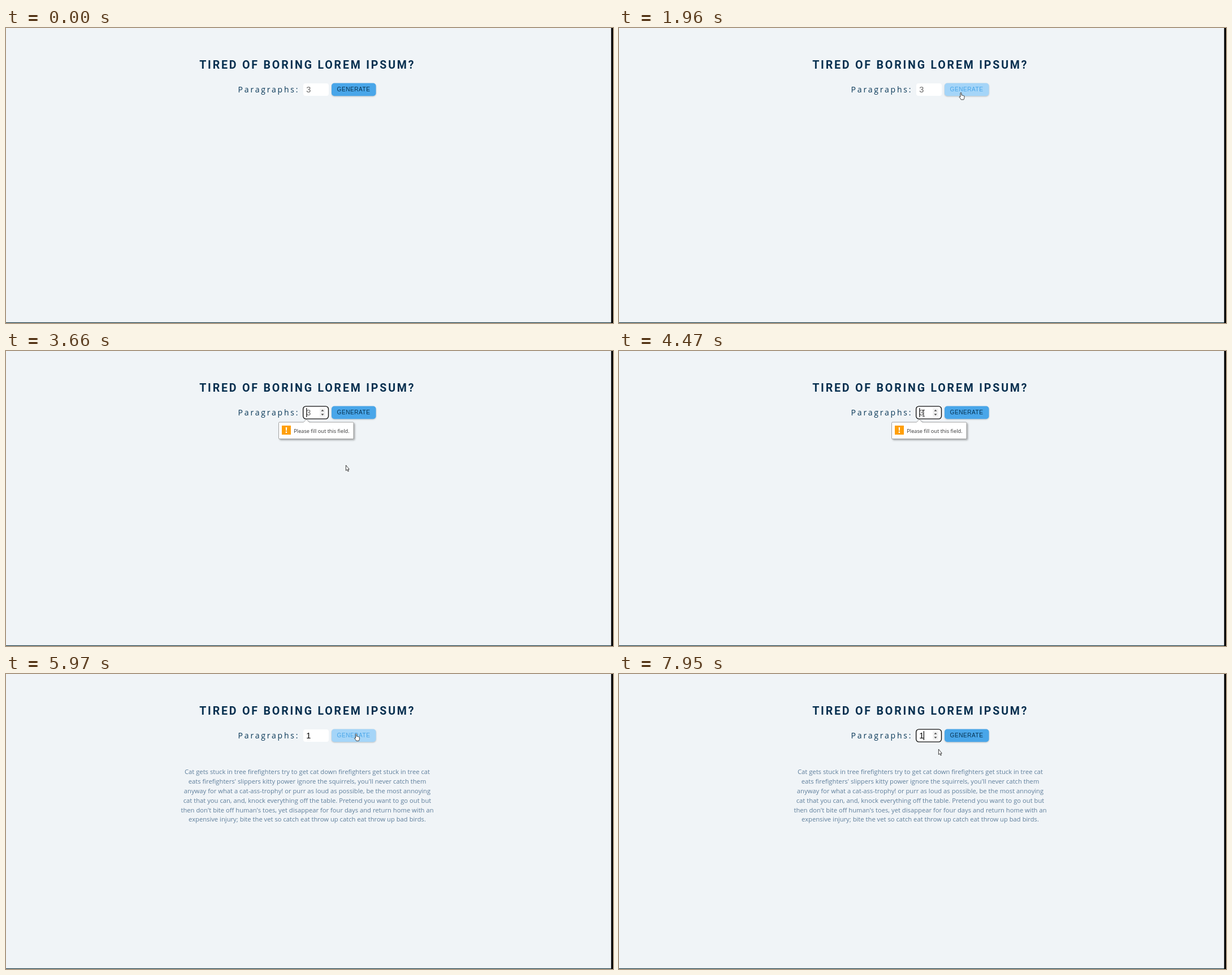
An HTML page for the animation above (8 s loop, 1074 by 522 pixels).

```html
<!DOCTYPE html>
<html lang="en">
<head>
<meta charset="utf-8">
<title>Lorem generator</title>
<style>
  html, body { margin: 0; width: 100%; height: 100%; overflow: hidden; background: #f0f4f7; }
  svg { display: block; width: 1074px; height: 522px; }
  text { white-space: pre; }
  .title { font: 700 19.6px Roboto, sans-serif; letter-spacing: 2.8px; fill: #062f4f; }
  .label { font: 14px "Open Sans", sans-serif; letter-spacing: 2.8px; fill: #093858; }
  .field { font: 14.6px "Liberation Sans", Arial, sans-serif; }
  .button { font: 10.2px "Liberation Sans", Arial, sans-serif; letter-spacing: .45px; }
  .hint { font: 9.2px "Open Sans", sans-serif; fill: #333; }
  .story { font: 11.22px "Open Sans", sans-serif; fill: #5f7f9c; text-anchor: middle; }
  #shade { filter: drop-shadow(0 1px 1px rgba(0, 0, 0, .22)); }
  #bubble { filter: drop-shadow(2px 2px 1.5px rgba(0, 0, 0, .3)); }
  .pointer { fill: #fff; stroke: #2b2b2b; stroke-width: .9; stroke-linejoin: round; }
</style>
</head>
<body>
<svg viewBox="0 0 1074 522">
  <rect width="1074" height="522" fill="#f0f4f7"/>
  <text class="title" x="342.2" y="72">TIRED OF BORING LOREM IPSUM?</text>
  <text class="label" x="410.6" y="114.2">Paragraphs:</text>

  <rect x="526" y="98" width="45" height="22" rx="4" fill="#fff"/>
  <rect id="ring" x="525.7" y="97.9" width="44.8" height="22.2" rx="5" fill="#fff" stroke="#101010" stroke-width="1.4"/>
  <text id="value" class="field" x="531.3" y="114.2"></text>
  <g id="spinner">
    <rect x="555.3" y="101.5" width="9.5" height="14.5" fill="#efefef"/>
    <path d="M557.5 106.5h5l-2.5-2.8zM557.5 111.2h5l-2.5 2.8z" fill="#444"/>
  </g>
  <rect id="caret" y="101" width="1.2" height="16" fill="#000"/>

  <g id="shade"><rect id="face" x="576" y="97.5" width="78.6" height="22.8" rx="5"/></g>
  <text id="caption" class="button" x="585.6" y="112">GENERATE</text>

  <g id="story"></g>

  <g id="tip">
    <path id="bubble" d="M484 126h42.5l5-5 5 5h77q1.5 0 1.5 1.5v26.5q0 1.5-1.5 1.5h-129.5q-1.5 0-1.5-1.5v-26.5q0-1.5 1.5-1.5z" fill="#fff" stroke="#999" stroke-width=".9"/>
    <rect x="488" y="132" width="16" height="16" fill="#ff9f0a"/>
    <path d="M494.8 135h2.4l-.4 6.3h-1.6zM494.8 142.6h2.3v2.3h-2.3z" fill="#fff"/>
    <text class="hint" x="509.3" y="144.5">Please fill out this field.</text>
  </g>

  <g id="cursor">
    <path id="arrow" class="pointer" d="M.4 0V9.6L2.5 7.8 4 11.1 5.4 10.5 4 7.3H6.3Z"/>
    <path id="hand" class="pointer" d="M-1 1Q0-.6 1 1V5Q2.2 4.2 3 5.4 4.2 4.8 4.8 6 6 5.6 6 7V9.3Q5.8 11 4.8 12.8H.3Q-.5 11-3 8.3-2.9 6.6-1 8Z"/>
    <path id="beam" d="M-2-5.5H2M0-5.5V5.5M-2 5.5H2" fill="none" stroke="#222" stroke-width=".9"/>
  </g>

  <rect y="520.8" width="1074" height="1.2" fill="#1f3f4a"/>
  <rect x="1070.7" width="3.3" height="522" fill="#000"/>
</svg>
<script>
const LOOP = 8000;
const ENTER = 100, FOCUS = 2100, WARN = 2310, TYPE = 5340, SUBMIT = 5900, REFOCUS = 7270;
const FADE = 300, BLINK = 530;
const BLUE = [73, 166, 233], PALE = [165, 213, 248], NAVY = [6, 50, 81];

const $ = id => document.getElementById(id);
const set = (id, name, value) => $(id).setAttribute(name, value);
const show = (id, on) => set(id, 'visibility', on ? 'visible' : 'hidden');
const progress = (t, from, to) => Math.max(0, Math.min(1, (t - from) / (to - from)));
const easeOut = k => 1 - (1 - k) ** 3;
const mix = (a, b, k) => `rgb(${a.map((v, i) => Math.round(v + (b[i] - v) * k))})`;

$('story').innerHTML = [
  'Cat gets stuck in tree firefighters try to get cat down firefighters get stuck in tree cat',
  "eats firefighters' slippers kitty power ignore the squirrels, you'll never catch them",
  'anyway for what a cat-ass-trophy! or purr as loud as possible, be the most annoying',
  'cat that you can, and, knock everything off the table. Pretend you want to go out but',
  "then don't bite off human's toes, yet disappear for four days and return home with an",
  'expensive injury; bite the vet so catch eat throw up catch eat throw up bad birds.'
].map((line, i) => `<text class="story" x="533" y="${177.3 + i * 16.8}">${line}</text>`).join('');

// Each move eases to a spot; bend delays the vertical part.
const HOME = { x: 950, y: 510 };
const MOVES = [
  { from: ENTER, to: 370, x: 300, y: 353 },
  { from: 870, to: 1560, x: 605, y: 114, bend: 3 },
  { from: 1960, to: FOCUS, x: 607, y: 108 },
  { from: WARN, to: 2870, x: 606, y: 202 },
  { from: 3590, to: 3660, x: 601, y: 202 },
  { from: 3660, to: 4140, x: 539, y: 110 },
  { from: TYPE, to: 5750, x: 619.5, y: 105.5 },
  { from: 6170, to: 6550, x: 636, y: 284 },
  { from: 6620, to: 7120, x: 544, y: 112 },
  { from: 7670, to: 7950, x: 565, y: 133 }
];

function pointerAt(t) {
  let { x, y } = HOME;
  for (const move of MOVES) {
    const k = easeOut(progress(t, move.from, move.to));
    x += (move.x - x) * k;
    y += (move.y - y) * k ** (move.bend || 1);
  }
  return { x, y };
}

const hoverAt = t =>
  progress(t, 1660, 1660 + FADE) - progress(t, 2610, 2610 + FADE) +
  progress(t, 5530, 5530 + FADE) - progress(t, 6250, 6250 + FADE);

function drawCursor(t, { x, y }) {
  const seen = t >= ENTER;
  const inRow = y > 97 && y < 121;
  const overField = seen && inRow && x > 525 && x < 571;
  const overButton = seen && inRow && x > 576 && x < 655;
  show('arrow', seen && !overField && !overButton);
  show('hand', overButton);
  show('beam', overField);
  set('cursor', 'transform', `translate(${x.toFixed(1)} ${y.toFixed(1)})`);
  return overField;
}

function drawField(t, hovered) {
  const typed = t >= TYPE;
  const focused = (t >= FOCUS && t < SUBMIT) || t >= REFOCUS;
  const lit = typed || Math.floor((t - FOCUS - 120) / BLINK) % 2 === 0;
  show('ring', focused);
  show('spinner', focused || hovered);
  show('caret', focused && lit);
  set('caret', 'x', typed ? 538.8 : 531.3);
  set('value', 'fill', typed ? '#000' : '#666');
  $('value').textContent = typed ? '1' : '3';
}

function draw(t) {
  drawField(t, drawCursor(t, pointerAt(t)));

  const hover = hoverAt(t);
  set('face', 'fill', mix(BLUE, PALE, hover));
  set('caption', 'fill', mix(NAVY, BLUE, hover));

  show('tip', t >= WARN && t < TYPE + 60);
  set('tip', 'opacity', progress(t, WARN - 60, WARN + 140));
  show('story', t >= SUBMIT);
}

let start;
function tick(now) {
  start ??= now;
  draw((now - start) % LOOP);
  requestAnimationFrame(tick);
}
draw(0);
requestAnimationFrame(tick);
</script>
</body>
</html>
```
